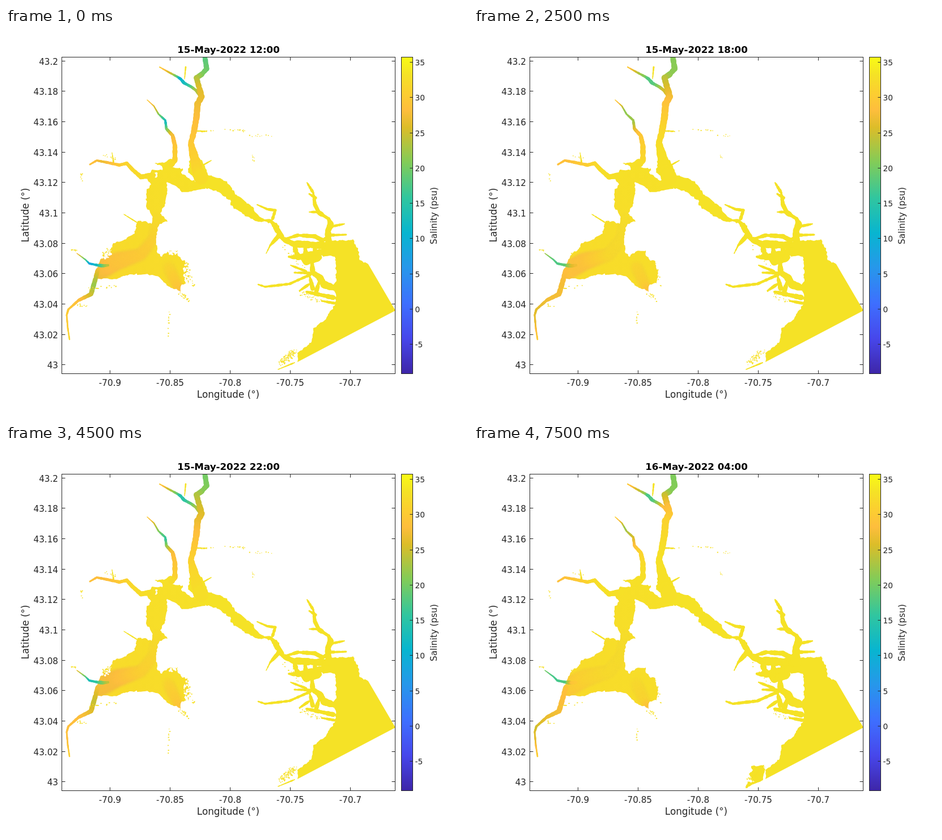
Write an HTML page with a canvas that moves like this. It is 815 px wide and 687 px high and loops after 8000 ms.

```html
<!DOCTYPE html>
<html lang="en">
<head>
<meta charset="utf-8">
<title>Salinity map</title>
<style>
html, body { margin: 0; width: 100%; height: 100%; overflow: hidden; background: #fff; }
canvas, svg { position: absolute; left: 0; top: 0; }
text { font-family: "DejaVu Sans", sans-serif; fill: #262626; }
</style>
</head>
<body>
<canvas id="map" width="815" height="687"></canvas>
<svg id="axes" width="815" height="687" viewBox="0 0 815 687"></svg>
<script>
// Colour scale in ninths, with half steps at the warm end
const SCALE = ["#3e26a8", "#4747eb", "#3e6fff", "#2797eb", "#08b5d0", "#31c69f",
  "#81cc59", "#dcbd29", "#febe3d", "#fccf30", "#f5e226", "#f9fb15"];
const PSU_MIN = -9.2, PSU_MAX = 35.7;
const stopAt = i => (i < 8 ? i : (i + 7) / 2) / 9;
const lerp = (a, b, t) => a + (b - a) * t;
const channels = hex => [1, 3, 5].map(k => parseInt(hex.slice(k, k + 2), 16));

function colour(psu) {
  const v = (psu - PSU_MIN) / (PSU_MAX - PSU_MIN);
  let i = 1;
  while (stopAt(i) < v && i < SCALE.length - 1) i++;
  const t = (v - stopAt(i - 1)) / (stopAt(i) - stopAt(i - 1));
  const a = channels(SCALE[i - 1]), b = channels(SCALE[i]);
  return `rgb(${a.map((c, k) => Math.round(lerp(c, b[k], t)))})`;
}

// Value at fraction t of an evenly spaced list
function along(list, t) {
  const p = t * (list.length - 1), i = Math.min(Math.floor(p), list.length - 2);
  return lerp(list[i], list[i + 1], p - i);
}

const pts = s => s.trim().split(/\s+/).map(p => p.split(",").map(Number));
const nums = s => s.split(" ").map(Number);

function seeded(seed) {
  let s = Math.floor(seed) % 2147483646 + 1;
  const next = () => (s = s * 16807 % 2147483647) / 2147483647;
  next(); next();
  return next;
}

// Coastlines
const greatBay = pts(`232,341 246,341 258,347 270,348 265,367 266,395 275,404 285,395 303,393 303,402
  311,411 320,412 325,434 322,451 310,453 308,466 286,456 270,440 245,435 218,435 198,442 160,444
  160,426 170,402 187,388 189,380 212,373 227,363`);
const littleBay = pts(`246,264 258,250 276,251 275,244 262,239 279,238 290,231 299,234 294,246 312,248
  309,256 325,268 339,272 352,262 352,284 334,287 310,290 301,280 284,272 284,290 280,312 272,327
  285,342 271,346 268,352 258,352 257,331 247,315 248,288 256,276`);
const harbour = pts(`324,222 337,222 348,240 356,259 376,265 390,271 399,286 409,297 433,315 447,333
  456,338 468,338 482,349 490,366 480,368 466,344 440,341 425,333 396,313 397,306 376,290 357,283
  341,283 339,272 321,255 324,240`);
const ocean = pts(`571,374 586,376 612,373 621,391 624,410 639,417 687,499 514,590 514,574 530,563
  538,556 542,530 560,518 580,490 582,470 574,460 583,447 580,404 573,402 560,404 547,394 562,386`);
const isles = pts("479,606 483,595 495,595 485,581 492,574 489,567 512,565 513,575 510,590");

// A channel: path, widths, then salinity along it at low water, flood, high water and ebb
const channel = (path, width, ...psu) => ({ path: pts(path), width: nums(width), psu: psu.map(nums) });

const northwest = channel("271,69 287,78 302,86 308,90 314,97 327,104 335,110 342,120", "2 4 5.5 5 5",
  "30.5 24 10 13 22 25", "30.5 23 12.5 14 26 28", "30 24 17 18 28 28.5", "30 21 18.5 18 21.5 23.5");
const mainRiver = channel(`351,53 354,72 345,82 336,88 341,106 345,121 338,134 336,158 331,186 326,203
  331,224 338,252 344,264`, "9 9 11 10 24",
  "18 20.5 26 27 29 30.5 32.5", "18.5 20 27 28.3 30.5 32.5 33",
  "20.5 21 27.7 31 32.8 33 33", "21.5 22 24 26.5 31 33 33");
const northFork = channel("249,127 261,138 269,152 281,163 283,178 294,190 298,208 298,234 292,241", "1.5 3 5 8 10",
  "30 24 12 27 30 32.6", "30 18 20 28 30.5 33", "31 22 26 31 32.5 33", "30 21 19 27.5 29.5 32.8");
const westFork = channel("148,241 160,234 176,237 200,242 213,239 223,250 238,263 260,260", "3 4.5 6 7 10",
  "29 27 31 32 32.6", "29 28.5 31 32.5 32.9", "28.5 29 32 33 33", "28.5 28.5 30.5 32.3 33");
const millCreek = channel("125,398 140,409 147,416 162,419 172,420 180,419", "1.5 3 5.5 4",
  "28 18 8 13 20 25", "22 12 11 12 28 29.5", "20 17 17 18 29 30", "25 19 18 20 22 25");
const southFork = channel("162,427 157,446 150,470 128,481 110,497 107,507 109,530 112,550", "8 8 4 3 2.5",
  "27.5 22 28 30 30 32", "29.5 27.5 21 30 30.5 32", "29 28 27 25 26.5 31", "28 27 28 27 27 30");
const rivers = [northwest, mainRiver, northFork, westFork, millCreek, southFork];

// Soft fronts spreading through the bay
const westPlume = channel("158,432 195,412 238,400 260,372 266,335", "25 23 13 10 8",
  "27 29 30 31 32.4", "29 29.7 31.2 32.1 32.6", "29.5 31 32.2 32.4 32.6", "28 26.8 31.6 32.3 32.6");
const eastPlume = channel("286,420 301,453 308,466", "13 11 6",
  "31.8 30 28.5", "32 30.5 28.5", "32.1 31.4 27.5", "31.2 30.3 28.5");
const plumes = [westPlume, eastPlume];

// Tidal creeks of one width, tapering towards their heads
const creeks = (width, list) =>
  list.split(";").map(path => ({ path: pts(path), width: [width * .6, width, width * 1.1] }));

const rills = creeks(2.2, `208,329 232,344; 187,220 190,239; 362,234 346,243; 352,182 336,182;
  315,90 317,69; 459,398 466,384; 480,603 509,591`);
const inlets = creeks(4.5, `531,273 542,291; 535,293 546,300; 535,325 551,325; 597,346 572,351;
  600,365 570,366; 443,312 461,320 475,322 470,338; 445,453 457,457 500,452 538,435;
  502,419 530,430; 509,432 540,433; 518,464 534,453; 557,482 579,486`);
const arms = creeks(7, `542,291 545,312 552,326 569,337; 488,374 515,366 545,368 558,375 568,371;
  466,384 482,366; 499,404 518,406; 527,383 529,400; 545,383 545,400; 536,440 541,460;
  553,446 546,470; 530,466 549,470 577,476`);
const sounds = creeks(11, `569,337 573,347 568,358 569,376; 475,347 488,372 506,381 556,384 571,384;
  508,384 515,405 542,400 556,396; 522,405 528,414 553,405; 540,417 541,432 553,440 561,453 575,458`);

// Scattered pools: from, to, count, spread
const pools = pts(`386,178,421,181,14,4 424,189,471,190,10,4 434,220,437,237,5,4 343,182,365,181,14,2
  132,255,134,271,8,4 169,222,190,229,9,5 288,500,284,553,10,3 124,488,143,490,10,5 146,458,196,457,14,7
  306,467,322,482,24,6 318,414,331,458,20,5 168,400,186,387,18,6 484,592,509,570,110,10 113,391,124,392,12,2
  515,465,552,484,28,9 491,383,532,436,22,9`);

// Mud exposed at low water: centre and radii
const flats = pts("174,396,12,11 320,430,6,22 295,396,9,4 263,259,4,4");

// Per two-hour step: tidal phase (0 low, 1 flood, 2 high, 3 ebb), water level in the bay and at sea
const STEPS = [
  [0, 0, .1], [1, .6, .6], [2, 1, .85], [2.5, 1, .5], [3, .75, .1],
  [3.5, .3, 0], [0, 0, .1], [1, .65, .65], [2, 1, 1]
];
const FIRST = 500, HOLD = 1000, LOOP = 8000;

const ctx = document.getElementById("map").getContext("2d");

// Fills a coastline, breaking up all but the long straight edges
function coast(path, fill) {
  const rnd = seeded(path[0][0] * 97 + path[0][1]);
  ctx.beginPath();
  path.forEach((a, i) => {
    const b = path[(i + 1) % path.length], len = Math.hypot(b[0] - a[0], b[1] - a[1]);
    const n = len > 60 ? 1 : Math.max(1, Math.round(len / 3));
    for (let k = 0; k < n; k++) {
      const amp = k ? 3 : 0;
      ctx.lineTo(lerp(a[0], b[0], k / n) + (rnd() - .5) * amp, lerp(a[1], b[1], k / n) + (rnd() - .5) * amp);
    }
  });
  ctx.fillStyle = fill;
  ctx.fill();
}

function strand({ path, width }, psuAt, scale, rough) {
  const rnd = seeded(path[0][0] * 31 + path[0][1]), last = path.length - 1;
  ctx.lineCap = "round";
  for (let i = 0; i < last; i++) {
    const [x, y] = path[i], [u, v] = path[i + 1];
    const n = Math.ceil(Math.hypot(u - x, v - y) / 2);
    for (let k = 0; k < n; k++) {
      const t = k / n, e = (k + 1) / n, at = (i + t) / last;
      ctx.strokeStyle = colour(psuAt(at));
      ctx.lineWidth = Math.max(1.2, along(width, at) * scale * (1 + (rnd() - .5) * rough));
      ctx.beginPath();
      ctx.moveTo(lerp(x, u, t), lerp(y, v, t));
      ctx.lineTo(lerp(x, u, e), lerp(y, v, e));
      ctx.stroke();
    }
  }
}

function scatter([x, y, u, v, count, spread], tide) {
  const rnd = seeded(x * 53 + y), n = Math.round(count * (1 - .4 * tide));
  ctx.fillStyle = colour(33);
  for (let i = 0; i < n; i++) {
    const t = rnd(), dx = (rnd() - .5) * spread, dy = (rnd() - .5) * spread;
    ctx.fillRect(lerp(x, u, t) + dx, lerp(y, v, t) + dy, 1 + rnd() * 1.6, 1 + rnd());
  }
}

function holes([x, y, rx, ry], n) {
  const rnd = seeded(x * 71 + y);
  ctx.globalCompositeOperation = "destination-out";
  for (let i = 0; i < n; i++) {
    const a = rnd() * 2 * Math.PI, r = Math.sqrt(rnd());
    ctx.beginPath();
    ctx.arc(x + Math.cos(a) * r * rx, y + Math.sin(a) * r * ry, .8 + rnd() * 1.5, 0, 7);
    ctx.fill();
  }
  ctx.globalCompositeOperation = "source-over";
}

function drawMap([phase, bay, sea]) {
  const i = Math.floor(phase), f = phase - i;
  const blend = psu => t => lerp(along(psu[i], t), along(psu[(i + 1) % 4], t), f);
  const salt = colour(33.2);
  const inland = ctx.createLinearGradient(180, 430, 340, 270);
  inland.addColorStop(0, colour(lerp(32, 32.3, bay)));
  inland.addColorStop(1, colour(33));

  ctx.clearRect(0, 0, 815, 687);
  ctx.save();
  ctx.beginPath();
  ctx.rect(98, 51, 589, 560);
  ctx.clip();

  coast(greatBay, inland);
  coast(littleBay, inland);
  coast(harbour, salt);
  coast(ocean, salt);
  const dry = Math.max(0, 1 - bay * 1.4);
  flats.forEach(m => holes(m, Math.round(m[2] * m[3] * .5 * dry)));

  ctx.globalCompositeOperation = "source-atop";
  ctx.filter = "blur(3px)";
  plumes.forEach(p => strand(p, blend(p.psu), 1, 0));
  ctx.filter = "none";
  ctx.globalCompositeOperation = "source-over";

  [rills, inlets, arms, sounds].flat().forEach(c => strand(c, () => 33.2, .9 + .2 * sea, .6));
  rivers.forEach(r => strand(r, blend(r.psu), .94 + .1 * bay, .3));
  if (sea > .5) {
    coast(isles, salt);
    holes([498, 581, 14, 15], Math.round((1 - sea) * 130));
  }
  pools.forEach(p => scatter(p, bay));
  ctx.restore();
}

function drawAxes() {
  const out = [];
  const line = (x, y, u, v) => out.push(`<path d="M${x} ${y}L${u} ${v}" stroke="#262626"/>`);
  const text = (s, x, y, size, anchor, extra = "") =>
    out.push(`<text x="${x}" y="${y}" font-size="${size}" text-anchor="${anchor}" ${extra}>${s}</text>`);
  const side = (s, x, y, size) => text(s, x, y, size, "middle", `transform="rotate(-90 ${x} ${y})"`);
  const box = (x, w, fill) =>
    out.push(`<rect x="${x}" y="51.5" width="${w}" height="559" fill="${fill}" stroke="#262626"/>`);

  const stops = SCALE.map((c, i) => `<stop offset="${stopAt(i)}" stop-color="${c}"/>`).join("");
  out.push(`<linearGradient id="scale" x1="0" y1="1" x2="0" y2="0">${stops}</linearGradient>`);
  box(98.5, 588, "none");
  box(697.5, 20, "url(#scale)");

  for (let i = 0; i <= 10; i++) {
    const y = Math.round(58.7 + i * 53.65) - .5;
    line(98, y, 104.5, y);
    line(680.5, y, 687, y);
    text(+(43.2 - i * .02).toFixed(2), 92, y + 6, 15.2, "end");
  }
  for (let i = 0; i < 5; i++) {
    const x = Math.round(183 + i * 106) + .5;
    line(x, 51, x, 57.5);
    line(x, 604.5, x, 611);
    text(+(-70.9 + i * .05).toFixed(2), x, 632, 15.2, "middle");
  }
  for (let i = 0; i < 9; i++) {
    const y = Math.round(60 + i * 62.25) + .5;
    line(712.5, y, 718, y);
    text(35 - i * 5, 721.5, y + 5, 13.8, "start");
  }
  text("Longitude (°)", 392, 653, 16.8, "middle");
  side("Latitude (°)", 40, 330.5, 16.8);
  side("Salinity (psu)", 760, 331.5, 15.3);
  text("", 392.5, 43.5, 16.7, "middle", `id="date" font-weight="700" style="fill:#000"`);
  document.getElementById("axes").innerHTML = out.join("");
}

drawAxes();
const date = document.getElementById("date");
const start = performance.now();
let shown = -1;

function tick() {
  const t = (performance.now() - start) % LOOP;
  const step = t < FIRST ? 0 : 1 + Math.floor((t - FIRST) / HOLD);
  if (step !== shown) {
    shown = step;
    const hour = 12 + step * 2;
    date.textContent = `${15 + Math.floor(hour / 24)}-May-2022 ${String(hour % 24).padStart(2, "0")}:00`;
    drawMap(STEPS[step]);
  }
  requestAnimationFrame(tick);
}
tick();
</script>
</body>
</html>
```
